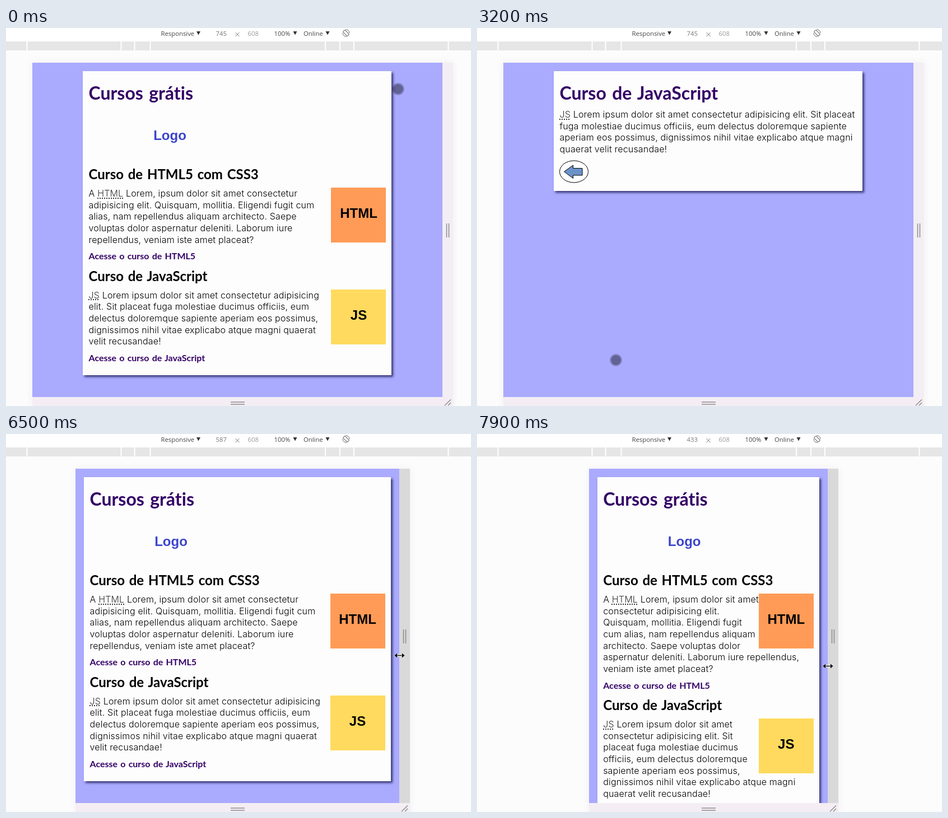
These frames come from a looping animation (830 px wide and 675 px high, 8000 ms). An HTML page:

```html
<!DOCTYPE html>
<html lang="pt">
<head>
<meta charset="utf-8">
<title>Cursos grátis</title>
<style>
@property --w { syntax: "<integer>"; inherits: true; initial-value: 745; }

html, body { margin: 0; width: 100%; height: 100%; overflow: hidden; }
#stage {
  --half: calc(var(--w) * .4915px);
  position: relative; width: 830px; height: 675px; overflow: hidden;
  background: #fcfcfc; animation: resize 8s infinite;
}
#stage > * { position: absolute; }

/* toolbar and ruler */
#tools { left: 0; top: 0; }
#tools text, #count { font: 11.3px "Open Sans", sans-serif; fill: #444; }
#tools .dim { fill: #999; }
#count { left: 374.5px; top: 1px; line-height: 17px; color: #777; }
#count::after { counter-reset: w var(--w); content: counter(w); }

/* resizable viewport */
#device {
  left: calc(413px - var(--half)); top: 62px;
  width: calc(var(--half) * 2 + 19px); height: 613px;
  background: #f4eef4; box-shadow: 0 0 11px rgba(190, 160, 190, .16);
}
#view { position: absolute; left: 0; top: 0; right: 19px; height: 597px; overflow: hidden; background: #aaf; }
#bar { position: absolute; right: 0; top: 0; width: 19px; height: 597px; background: #f2eef3; animation: bar 8s step-end infinite; }
#device > svg { position: absolute; right: 0; top: 0; }

/* pages */
.page { position: absolute; inset: 0; padding: 15px; visibility: hidden; animation: 8s step-end infinite; }
.home { animation-name: home; }
.html { animation-name: html; }
.js { animation-name: js; }
.card {
  box-sizing: border-box; max-width: 551px; margin: 0 auto; padding: 10px 10px 11px;
  background: #fdfdfd; box-shadow: 3px 3px 4px rgba(10, 10, 60, .72);
}
h1, h2, p { margin: 0; }
h1, h2, .link {
  font-family: Lato, sans-serif; font-weight: 700; word-spacing: .08em;
  font-variant-ligatures: none; white-space: nowrap;
}
h1 { font-size: 32px; line-height: 57px; color: #306; }
h2 { font-size: 24px; line-height: 32.4px; margin-bottom: 7.6px; color: #000; }
p { font: 300 16px/20.67px Inter, sans-serif; letter-spacing: .18px; color: #000; }
.link { font-size: 16px; line-height: 38.4px; color: #306; }
abbr { color: #333; text-decoration: underline dotted 1.5px; text-underline-offset: 2px; }
.logo, .tile { font: 700 24px "Liberation Sans", Arial, sans-serif; text-align: center; }
.logo { width: 290px; height: 101px; line-height: 95.4px; color: #3b44cc; }
.tile { float: right; width: 98px; height: 98px; margin-left: -1px; line-height: 91px; color: #000; }
.orange { background: #ff9b57; }
.yellow { background: #ffda5e; }
.back { display: block; width: 52px; height: 41px; margin: 9px 0 3px; }

/* pointers */
#dot {
  left: -11px; top: -11px; width: 18px; height: 18px; border-radius: 50%;
  background: rgba(0, 0, 0, .42); background-clip: padding-box;
  border: 2px solid rgba(0, 0, 0, .2); animation: dot 8s step-end infinite;
}
#arrow { left: 0; top: 0; animation: arrow 8s step-end infinite; }
#grip { left: calc(404px + var(--half)); top: -6px; animation: grip 8s infinite; }

@keyframes resize {
  0% { --w: 745; animation-timing-function: step-end; }
  67.5% { --w: 745; animation-timing-function: steps(9); }
  78.75% { --w: 606; animation-timing-function: steps(2); }
  81.25% { --w: 587; animation-timing-function: steps(5); }
  87.5% { --w: 515; animation-timing-function: steps(2); }
  90% { --w: 482; animation-timing-function: steps(7); }
  98.75%, 100% { --w: 433; }
}
@keyframes bar {
  0% { background: #f2eef3; }
  65%, 100% { background: #d9d9d9; }
}
@keyframes home {
  0%, 25%, 52.5%, 100% { visibility: visible; }
  11.25%, 40% { visibility: hidden; }
}
@keyframes html {
  0%, 25%, 100% { visibility: hidden; }
  11.25% { visibility: visible; }
}
@keyframes js {
  0%, 52.5%, 100% { visibility: hidden; }
  40% { visibility: visible; }
}
@keyframes dot {
  0% { transform: translate(700px, 109px); opacity: 1; }
  1.25% { transform: translate(650px, 190px); }
  2.5% { transform: translate(520px, 340px); }
  3.75% { transform: translate(390px, 467px); }
  5% { transform: translate(300px, 440px); }
  6.25% { transform: translate(270px, 415px); }
  16.25% { transform: translate(265px, 395px); }
  17.5% { transform: translate(252px, 364px); }
  18.75% { transform: translate(228px, 325px); }
  20% { transform: translate(203px, 290px); }
  21.25% { transform: translate(186px, 268px); }
  22.5% { transform: translate(181px, 260px); }
  25% { transform: translate(195px, 330px); }
  26.25% { transform: translate(225px, 460px); }
  27.5% { transform: translate(247px, 559px); }
  31.25% { transform: translate(247px, 566px); }
  32.5% { transform: translate(247px, 574px); }
  33.75% { transform: translate(247px, 582px); }
  35% { transform: translate(248px, 589px); }
  36.25% { transform: translate(248px, 593px); }
  45% { transform: translate(230px, 500px); }
  46.25% { transform: translate(200px, 390px); }
  47.5% { transform: translate(180px, 300px); }
  48.75% { transform: translate(170px, 264px); }
  52.5% { transform: translate(350px, 290px); }
  53.75% { transform: translate(560px, 320px); }
  55% { transform: translate(696px, 345px); }
  57.5% { transform: translate(740px, 358px); opacity: 1; }
  58.75%, 100% { transform: translate(740px, 358px); opacity: 0; }
}
@keyframes arrow {
  0% { transform: translate(782px, 364px); visibility: hidden; }
  58.75% { transform: translate(782px, 364px); visibility: visible; }
  60% { transform: translate(800px, 369px); }
  61.25% { transform: translate(808px, 373px); }
  62.5% { transform: translate(799px, 376px); }
  63.75% { transform: translate(794px, 378px); visibility: visible; }
  65%, 100% { transform: translate(794px, 378px); visibility: hidden; }
}
@keyframes grip {
  0% { transform: translateY(380px); visibility: hidden; animation-timing-function: step-end; }
  65% { transform: translateY(380px); visibility: visible; animation-timing-function: step-end; }
  67.5% { transform: translateY(380px); visibility: visible; animation-timing-function: steps(11); }
  81.25% { transform: translateY(395px); visibility: visible; animation-timing-function: steps(5); }
  87.5% { transform: translateY(402px); visibility: visible; animation-timing-function: steps(9); }
  98.75%, 100% { transform: translateY(414px); visibility: visible; }
}
</style>
</head>
<body>
<div id="stage">
  <svg id="tools" width="830" height="41">
    <symbol id="back" viewBox="0 0 52 41">
      <ellipse cx="26" cy="20.5" rx="25.5" ry="19.5" fill="#fff" stroke="#000"/>
      <path fill="#6b93c9" stroke="#000" d="M8.5 20.5l16-11.5v5.5h16.500v12.500h-16.500v5.500z"/>
    </symbol>
    <path fill="#fff" d="M0 0h830v24H0z"/>
    <path fill="#e6e6e6" d="M0 24h830v16H0z"/>
    <path stroke="#fff" stroke-width="2" d="M37.5 24v16M205.5 24v16M229.5 24v16M257.5 24v16M570 24v16M596 24v16M621 24v16M789.5 24v16"/>
    <text x="276.5" y="13.5">Responsive</text>
    <text class="dim" x="431.5" y="13.5">608</text>
    <text x="478.5" y="13.5">100%</text>
    <text x="531" y="13.5">Online</text>
    <path fill="#333" d="M340 6h7l-3.5 6.5zM512.5 6h7l-3.5 6.5zM570.5 6h7l-3.5 6.5z"/>
    <path stroke="#777" d="M409.5 8l7 7m0-7l-7 7"/>
    <g fill="none" stroke="#666">
      <rect x="604.5" y="3.5" width="5" height="11" rx="1" transform="rotate(-45 607 9)"/>
      <path d="M606 2.8a6.2 6.2 0 0 1 7 6.2M608 15.2a6.2 6.2 0 0 1-7-6.2"/>
    </g>
  </svg>
  <div id="count"></div>

  <div id="device">
    <div id="view">
      <div class="page home"><div class="card">
        <h1>Cursos grátis</h1>
        <div class="logo">Logo</div>
        <h2>Curso de HTML5 com CSS3</h2>
        <div class="tile orange">HTML</div>
        <p>A <abbr>HTML</abbr> Lorem, ipsum dolor sit amet consectetur adipisicing elit. Quisquam, mollitia. Eligendi fugit cum alias, nam repellendus aliquam architecto. Saepe voluptas dolor aspernatur deleniti. Laborum iure repellendus, veniam iste amet placeat?</p>
        <div class="link">Acesse o curso de HTML5</div>
        <h2>Curso de JavaScript</h2>
        <div class="tile yellow">JS</div>
        <p><abbr>JS</abbr> Lorem ipsum dolor sit amet consectetur adipisicing elit. Sit placeat fuga molestiae ducimus officiis, eum delectus doloremque sapiente aperiam eos possimus, dignissimos nihil vitae explicabo atque magni quaerat velit recusandae!</p>
        <div class="link">Acesse o curso de JavaScript</div>
      </div></div>

      <div class="page html"><div class="card">
        <h1>Curso de HTML5 com CSS</h1>
        <p>A <abbr>HTML</abbr> Lorem, ipsum dolor sit amet consectetur adipisicing elit. Quisquam, mollitia. Eligendi fugit cum alias, nam repellendus aliquam architecto. Saepe voluptas dolor aspernatur deleniti. Laborum iure repellendus, veniam iste amet placeat?</p>
        <svg class="back"><use href="#back"/></svg>
      </div></div>

      <div class="page js"><div class="card">
        <h1>Curso de JavaScript</h1>
        <p><abbr>JS</abbr> Lorem ipsum dolor sit amet consectetur adipisicing elit. Sit placeat fuga molestiae ducimus officiis, eum delectus doloremque sapiente aperiam eos possimus, dignissimos nihil vitae explicabo atque magni quaerat velit recusandae!</p>
        <svg class="back"><use href="#back"/></svg>
      </div></div>
    </div>
    <div id="bar"></div>
    <svg width="19" height="613" fill="none" stroke="#8c8c8c" stroke-width="1.5">
      <path d="M7.5 287v25M11.5 287v25M4 612l11-10.5M10 612l5-5"/>
    </svg>
  </div>
  <svg style="left:401px;top:666px" width="25" height="8">
    <path stroke="#8c8c8c" stroke-width="1.5" d="M0 2h25M0 6h25"/>
  </svg>

  <div id="dot"></div>
  <svg id="arrow" width="13" height="22">
    <path fill="#fff" stroke="#000" d="M.5 1v16l3.7-3.5 2.7 6.5 2.3-1-2.7-6.3h5z"/>
  </svg>
  <svg id="grip" width="19" height="13">
    <path stroke="#fff" stroke-width="4" d="M4 6.5h11"/>
    <path stroke="#000" stroke-width="1.5" d="M3 6.5h13"/>
    <path stroke="#fff" stroke-width=".5" d="M0 6.5l5.5-4.5v9zM19 6.5l-5.5-4.5v9z"/>
  </svg>
</div>
</body>
</html>
```
